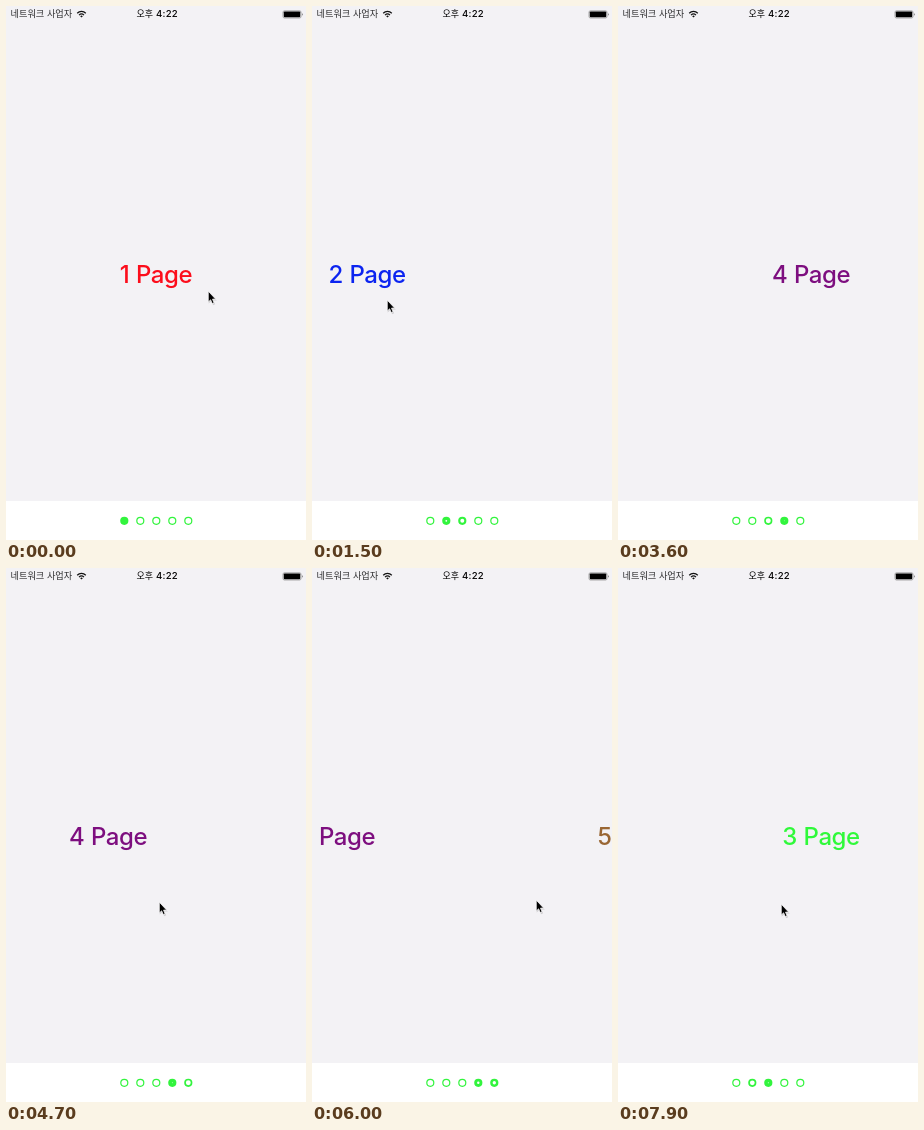
These frames come from a looping animation (300x534 px, 8 s). An HTML page:

```html
<!DOCTYPE html>
<html lang="ko">
<head>
<meta charset="utf-8">
<title>Page control</title>
<style>
  html, body { margin: 0; width: 100%; height: 100%; overflow: hidden; background: #f3f2f5; }
  svg { display: block; width: 300px; height: 534px; }
  .page { font: 500 24px Inter, sans-serif; letter-spacing: -0.45px; word-spacing: 0.7px; text-anchor: middle; }
  .carrier { font: 400 9.2px "Noto Sans CJK KR", "Noto Sans CJK", sans-serif; fill: #2c2c2e; }
  .noon { font: 500 9px "Noto Sans CJK KR", "Noto Sans CJK", sans-serif; }
  .clock { font: 500 9.6px Inter, sans-serif; letter-spacing: 0.25px; }
</style>
</head>
<body>
<svg viewBox="0 0 300 534" xmlns="http://www.w3.org/2000/svg">
  <rect width="300" height="534" fill="#f3f2f5"/>
  <g id="pages"></g>
  <rect y="495" width="300" height="39" fill="#fff"/>
  <g id="dots" fill="none" stroke="#32f43d"></g>

  <text class="carrier" x="4.5" y="11.2">네트워크 사업자</text>
  <g fill="none" stroke="#111" stroke-width="1.2">
    <path d="M71.2 7.2 A6.2 6.2 0 0 1 79.8 7.2"/>
    <path d="M73 9.1 A3.6 3.6 0 0 1 78 9.1"/>
    <path d="M75.5 11.6 L74.2 10.2 A1.9 1.9 0 0 1 76.8 10.2 Z" fill="#111" stroke="none"/>
  </g>
  <text class="noon" x="130.6" y="11.2">오후</text>
  <text class="clock" x="150" y="11.4">4:22</text>
  <rect x="277" y="4.8" width="18" height="7.2" rx="1.4" fill="none" stroke="#777" stroke-width="0.6"/>
  <rect x="277.8" y="5.5" width="16.4" height="5.8" rx="0.7"/>
  <path d="M296 7 Q297.2 8.4 296 9.8 Z" fill="#333"/>

  <g id="cursor">
    <path d="M0.6 1.4 V12.6 L3.3 10.2 L5.2 14.2 L7.2 13.3 L5.4 9.5 H8.8 Z" opacity="0.14"/>
    <path d="M0.3 0.2 V11 L2.6 8.8 L4.3 12.6 L6 11.8 L4.5 8.1 H7.6 Z" stroke="#fff" stroke-width="0.7"/>
  </g>
</svg>
<script>
const LOOP = 8000, STEP = 100, WIDTH = 300, RADIUS = 4.1;
const SLACK = 30;   // pointer travel before the page follows
const FLICK = 50;   // page travel that is enough to turn the page
const TAU = 60;     // settling time constant
const PAUSE = 300;  // pointer rest after a release, then its way back
const COLORS = ['#fc0d1b', '#0b24f0', '#2ff93a', '#7d0e7f', '#996633'];

const SWIPES = [
  { start: 0, end: 300, grab: 202, drop: 84, y: 285 },
  { start: 1100, end: 1500, grab: 200, drop: 75, y: 299 },
  { start: 2200, end: 2400, grab: 152, drop: 102, y: 294 },
  { start: 3200, end: 3550, grab: 205, drop: -26, y: 294 },
  { start: 4390, end: 4900, grab: 231, drop: 20, y: 334 },
  { start: 5700, end: 6000, grab: 20, drop: 224, y: 334 },
  { start: 6800, end: 7050, grab: 96, drop: 262, y: 332 },
  { start: 7700, end: 7900, grab: 80, drop: 163, y: 336 }
];

const byId = id => document.getElementById(id);
const mix = (a, b, k) => a + (b - a) * k;
const clamp = k => Math.min(1, Math.max(0, k));
const smooth = k => k * k * (3 - 2 * k);

// Signed page travel, in pixels, for a pointer at x
function travel(swipe, x) {
  const moved = swipe.grab - x;
  return Math.sign(moved) * Math.max(0, Math.abs(moved) - SLACK);
}

let page = 0;
for (const swipe of SWIPES) {
  const moved = travel(swipe, swipe.drop);
  swipe.from = page;
  if (Math.abs(moved) > FLICK) page += Math.sign(moved);
  swipe.to = page;
}

function stateAt(t) {
  const index = SWIPES.filter(swipe => swipe.start <= t).length - 1;
  const swipe = SWIPES[index], next = SWIPES[index + 1] || swipe;
  const pull = clamp((t - swipe.start) / (swipe.end - swipe.start)) ** 2;
  const back = smooth(clamp((t - swipe.end) / PAUSE - 1));
  const dragX = mix(swipe.grab, swipe.drop, pull);
  const held = swipe.from + travel(swipe, dragX) / WIDTH;
  const settle = t > swipe.end ? Math.exp((swipe.end - t) / TAU) : 1;
  return {
    scroll: t > swipe.end ? mix(swipe.to, held, settle) : held,
    x: mix(dragX, next.grab, back),
    y: mix(swipe.y, next.y, pull)
  };
}

function add(parent, tag, attrs) {
  const el = document.createElementNS('http://www.w3.org/2000/svg', tag);
  for (const name in attrs) el.setAttribute(name, attrs[name]);
  return parent.appendChild(el);
}

const pages = COLORS.map((fill, i) => {
  const label = add(byId('pages'), 'text', { class: 'page', y: 276.7, fill });
  label.textContent = `${i + 1} Page`;
  return label;
});
const dots = COLORS.map((_, i) => add(byId('dots'), 'circle', { cx: 118.3 + 16 * i, cy: 514.8 }));

function render(t) {
  const { scroll, x, y } = stateAt(t);
  pages.forEach((label, i) => label.setAttribute('x', 150 + (i - scroll) * WIDTH));
  dots.forEach((dot, i) => {
    const line = mix(1.2, RADIUS, clamp(1 - Math.abs(scroll - i)));
    dot.setAttribute('r', RADIUS - line / 2);
    dot.setAttribute('stroke-width', line);
  });
  byId('cursor').setAttribute('transform', `translate(${x} ${y})`);
}

const origin = performance.now();
function tick() {
  const t = (performance.now() - origin) % LOOP;
  render(Math.floor(t / STEP) * STEP);
  requestAnimationFrame(tick);
}
tick();
</script>
</body>
</html>
```
